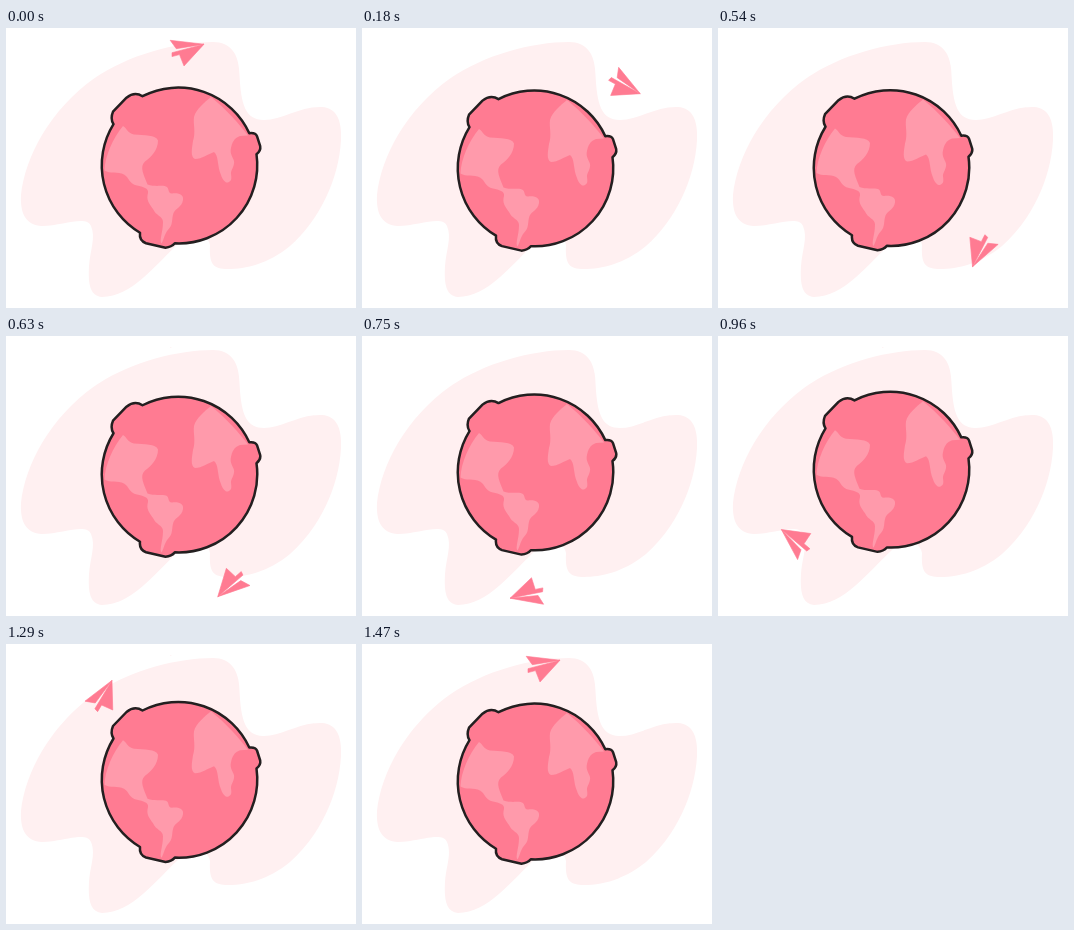
Recreate the animation shown at these times as an HTML page. Size 350 by 280 pixels, loop 1500 ms.

```html
<!DOCTYPE html>
<html lang="en">
<head>
<meta charset="utf-8">
<title>Plane around the globe</title>
<style>
  html, body { margin: 0; width: 100%; height: 100%; overflow: hidden; background: #fff; }
  svg { display: block; width: 100vw; height: 100vh; }
  .blob { fill: #fff0f1; }
  .globe { fill: #ff7b92; stroke: #231f20; stroke-width: 2.5; stroke-linejoin: round; }
  .land { fill: #ff9aab; }
  .plane { fill: #ff7b92; stroke: #ff7b92; stroke-width: .6; stroke-linejoin: round; }
</style>
</head>
<body>
<svg viewBox="0 0 350 280">
  <path class="blob" d="M207 14C225 14 233 26 233.500 47C235 76 239 92 258 92C276 92 294 78 316 79
    C331 80 336 93 335 112C333 150 314 192 284 218C262 236 240 241 222 241C207 241 203 236 204 217
    C202 205 186 202 174 214C150 236 126 269 96 269C84 268 82 256 83 238C84 222 90 210 85 198
    C80 187 57 198 36 198C20 197 14 186 15 167C19 129 44 82 88 50.500C122 27 170 14 207 14Z"/>
  <g id="globe">
    <path class="globe" d="M136.500 68.200A78.300 78.300 0 0 1 243.300 105.200Q249.500 104.500 251 108.200L254.200 118.200
      Q255 122.700 250.500 126.200A78.300 78.300 0 0 1 168.800 215.300Q165.500 219.200 159.500 219.700L140 215.200
      Q133 212.700 134 204.700A78.300 78.300 0 0 1 107.500 96.200Q104 90.700 107 83.700L120.500 69.700Q128.500 63.200 136.500 68.200Z"/>
    <path class="land" d="M205 69C199 74 190 81 188 89C187 96 190 104 187 113C186 120 184 129 189 131
      C196 131 202 126 208 124C213 128 211 138 215 147C217 153 220 155 222 154.500C226 153 225.500 150 225 146
      C224.500 142 229 138 228 133C227 129 223.500 126 225 120C226 115 228 110 234 108L242 107.500
      C234 97 220 81 205 69Z"/>
    <path class="land" d="M117 98C121 100 121 105 128 106.500C138 107.500 150 106.500 152 112.500
      C152 122 145 129 139 133.500C133 139 138 147 141.500 156.500C148 159 155 157 160 158.500C164 160.500 161 165 166 165.500
      C173 164.500 178 167 177 172C176 179 170 180 167.500 185C165.500 191 167 196 163.500 200C158.500 205 158.500 210 155.500 215.500
      C153 213 157 204 157 194C157 188 150 188 147 181C143 175 140 172 142 165C143 160 137 159 131 157.500
      C123 156 123 149 118 146.500C112 143.500 104 146 98.500 142.500C99 128 107 110 117 98Z"/>
  </g>
  <g id="plane" class="plane">
    <path d="M164.200 12.300L198 16.200L170.300 20.700Z"/>
    <path d="M198 16.200L166 24.700L166 28.600L173.500 26.600L178 38Z"/>
  </g>
</svg>
<script>
  const LOOP = 1500, STEP = 30, TURN = LOOP - STEP;
  const globe = document.getElementById('globe');
  const plane = document.getElementById('plane');
  // [time, vertical offset]
  const bob = [[0, 0], [300, 4.5], [1060, -4.2], [TURN, 0]];
  const ease = p => (1 - Math.cos(Math.PI * p)) / 2;

  function bobAt(t) {
    const i = Math.max(1, bob.findIndex(k => k[0] >= t));
    const [t0, y0] = bob[i - 1], [t1, y1] = bob[i];
    return y0 + (y1 - y0) * ease((t - t0) / (t1 - t0));
  }

  function draw() {
    const t = Math.floor(performance.now() % LOOP / STEP) * STEP;
    globe.setAttribute('transform', `translate(0 ${bobAt(t).toFixed(2)})`);
    plane.setAttribute('transform', `rotate(${(360 * t / TURN).toFixed(2)} 177 140)`);
    requestAnimationFrame(draw);
  }
  draw();
</script>
</body>
</html>
```
